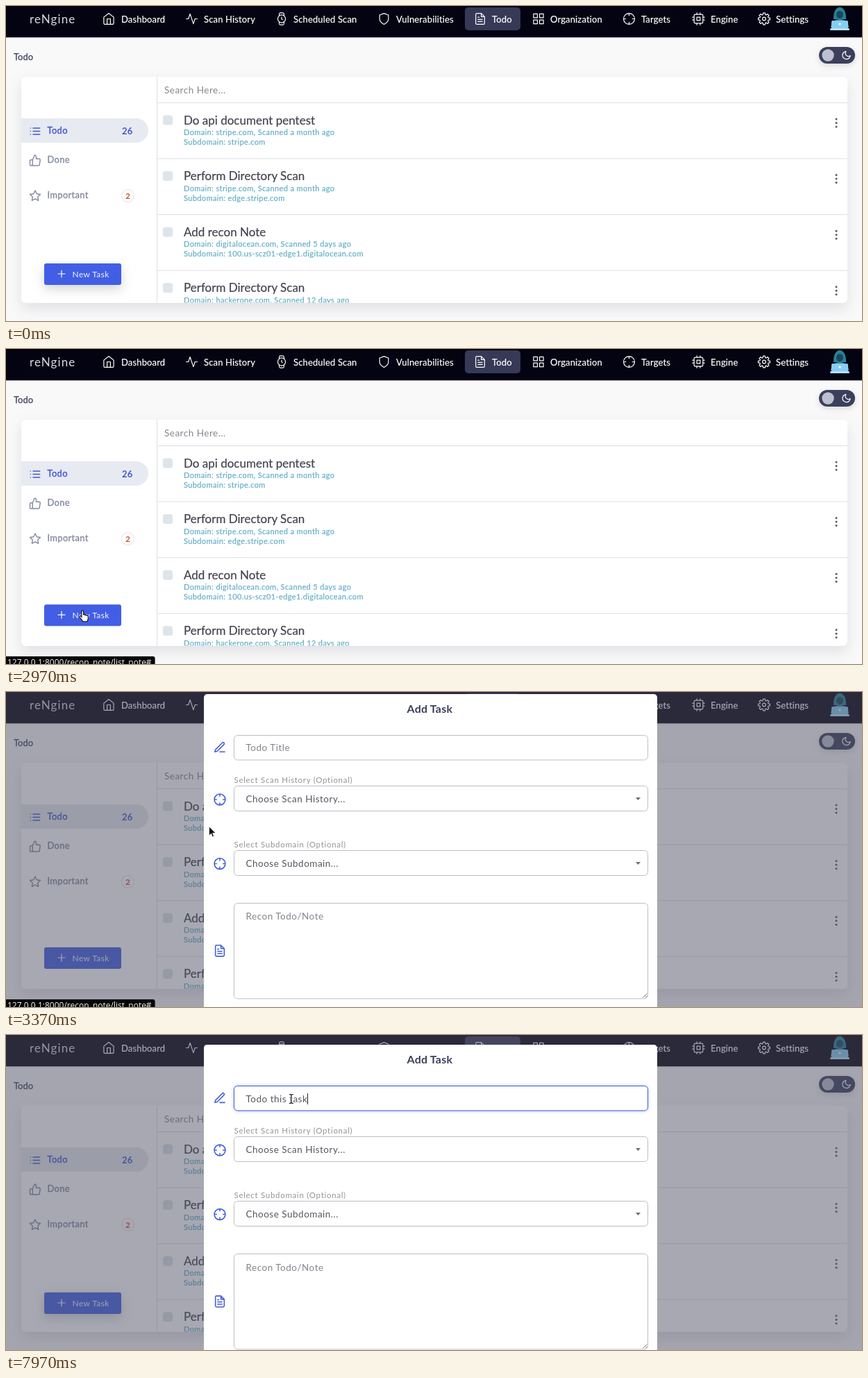
An HTML page that plays this animation: 1233 by 454 pixels, repeating every 8 s.

```html
<!DOCTYPE html>
<html lang="en">
<head>
<meta charset="utf-8">
<title>Todo</title>
<style>
  html, body { margin: 0; width: 100%; height: 100%; overflow: hidden; background: #f9f9f9; }
  svg { display: block; width: 1233px; height: 454px; }
  text { font-family: Lato, "Open Sans", sans-serif; white-space: pre; }
  .icon { fill: none; stroke-linecap: round; stroke-linejoin: round; }
  .brand { font-size: 17px; letter-spacing: 1.1px; fill: #d9dae3; }
  .nav { font-size: 13px; letter-spacing: .15px; fill: #fff; stroke: #fff; stroke-width: .2px; }
  .page { font-size: 13px; fill: #3b3f5c; stroke: #3b3f5c; stroke-width: .25px; }
  .title { font-size: 17px; fill: #42424e; stroke: #42424e; stroke-width: .2px; }
  .meta { font-size: 11px; letter-spacing: .38px; fill: #62adc5; stroke: #62adc5; stroke-width: .2px; }
  .side { font-size: 13px; letter-spacing: .3px; stroke-width: .35px; }
  .count { font-weight: 700; letter-spacing: .2px; }
  .badge { font-size: 12px; font-weight: 700; text-anchor: middle; }
  .btn { font-size: 12px; letter-spacing: .4px; fill: #f2f4ff; }
  .head { font-size: 16px; font-weight: 700; letter-spacing: .2px; fill: #3b3f5c; }
  .field { font-size: 13.5px; letter-spacing: .5px; fill: #55565e; }
  .hint { fill: #84858c; }
  .label { font-size: 11.5px; letter-spacing: .7px; fill: #92939b; }
  .status { font: 12px "Open Sans", "Noto Sans", sans-serif; fill: #f4f4f4; }
</style>
</head>
<body>
<svg id="stage" viewBox="0 0 1233 454"></svg>
<script>
const ICONS = {
  home: 'M3 9l9-7 9 7v11a2 2 0 0 1-2 2H5a2 2 0 0 1-2-2zM9 22V12h6v10',
  activity: 'M22 12h-4l-3 9L9 3l-3 9H2',
  watch: 'M5 12a7 7 0 1 0 14 0a7 7 0 1 0-14 0M12 9v3l1.5 1.5M16.5 17.35l-.35 3.83a2 2 0 0 1-2 1.82H9.83a2 2 0 0 1-2-1.82l-.35-3.83m0-10.7l.35-3.83A2 2 0 0 1 9.83 1h4.35a2 2 0 0 1 2 1.82l.35 3.83',
  shield: 'M12 22s8-4 8-10V5l-8-3-8 3v7c0 6 8 10 8 10z',
  file: 'M14 2H6a2 2 0 0 0-2 2v16a2 2 0 0 0 2 2h12a2 2 0 0 0 2-2V8zM14 2v6h6M16 13H8M16 17H8M10 9H8',
  grid: 'M3 3h7v7H3zM14 3h7v7h-7zM14 14h7v7h-7zM3 14h7v7H3z',
  cross: 'M2 12a10 10 0 1 0 20 0a10 10 0 1 0-20 0M22 12h-4M6 12H2M12 6V2M12 22v-4',
  cpu: 'M6 4h12a2 2 0 0 1 2 2v12a2 2 0 0 1-2 2H6a2 2 0 0 1-2-2V6a2 2 0 0 1 2-2zM9 9h6v6H9zM9 1v3M15 1v3M9 20v3M15 20v3M20 9h3M20 14h3M1 9h3M1 14h3',
  list: 'M8 6h13M8 12h13M8 18h13M3 6h.01M3 12h.01M3 18h.01',
  thumb: 'M14 9V5a3 3 0 0 0-3-3l-4 9v11h11.28a2 2 0 0 0 2-1.7l1.38-9a2 2 0 0 0-2-2.3zM7 22H4a2 2 0 0 1-2-2v-7a2 2 0 0 1 2-2h3',
  star: 'M12 2l3.09 6.26L22 9.27l-5 4.87 1.18 6.88L12 17.77l-6.18 3.25L7 14.14 2 9.27l6.91-1.01z',
  plus: 'M12 4v16M4 12h16',
  edit: 'M12 20h9M16.5 3.5a2.12 2.12 0 0 1 3 3L7 19l-4 1 1-4z',
  moon: 'M21 12.79A9 9 0 1 1 11.21 3 7 7 0 0 0 21 12.79z',
  gear: gearPath()
};

// Eight-toothed cog around (12,12) with a hub.
function gearPath() {
  const pts = [];
  for (let i = 0; i < 8; i++) {
    for (const [off, r] of [[-.27, 8], [-.17, 10.8], [.17, 10.8], [.27, 8]]) {
      const a = i * Math.PI / 4 + off;
      pts.push((12 + r * Math.cos(a)).toFixed(2) + ' ' + (12 + r * Math.sin(a)).toFixed(2));
    }
  }
  return 'M' + pts.join('L') + 'zM9 12a3 3 0 1 0 6 0a3 3 0 1 0-6 0';
}

const text = (x, y, cls, str, extra = '') => `<text x="${x}" y="${y}" class="${cls}" ${extra}>${str}</text>`;
const box = (x, y, w, h, r, fill, extra = '') =>
  `<rect x="${x}" y="${y}" width="${w}" height="${h}" rx="${r}" fill="${fill}" ${extra}/>`;
const line = (x1, y1, x2, y2, c = '#dedfe4') => `<path d="M${x1} ${y1}L${x2} ${y2}" stroke="${c}"/>`;
// Icon centred on (x, y), drawn at the given size.
const icon = (name, x, y, color, size = 19, width = 1.6) =>
  `<path class="icon" d="${ICONS[name]}" stroke="${color}" stroke-width="${width}"
    transform="translate(${x - size / 2} ${y - size / 2}) scale(${size / 24})"/>`;

const NAV = [
  ['home', 148, 166, 'Dashboard'], ['activity', 267.5, 285, 'Scan History'],
  ['watch', 397, 414, 'Scheduled Scan'], ['shield', 544.5, 562, 'Vulnerabilities'],
  ['file', 683, 700, 'Todo'], ['grid', 767, 784, 'Organization'],
  ['cross', 897.5, 915, 'Targets'], ['cpu', 997.5, 1015, 'Engine'], ['gear', 1092, 1109, 'Settings']
];
const ROWS = [
  ['Do api document pentest', 'stripe.com', 'a month', 'stripe.com'],
  ['Perform Directory Scan', 'stripe.com', 'a month', 'edge.stripe.com'],
  ['Add recon Note', 'digitalocean.com', '5 days', '100.us-scz01-edge1.digitalocean.com'],
  ['Perform Directory Scan', 'hackerone.com', '12 days', 'hackerone.com']
];

function header() {
  const items = NAV.map(([name, ix, tx, label]) =>
    icon(name, ix, 18.5, '#fff', 19, 1.5) + text(tx, 24, 'nav', label)).join('');
  const avatar = `<path d="M1192 19c-1-23 19-23 18 0z" fill="#2a7f98"/>
    <ellipse cx="1201" cy="12.5" rx="5" ry="5.5" fill="#17485c"/>
    <path d="M1188 31c0-16 26-16 26 0z" fill="#3b8fb0"/>
    ${box(1189, 21, 24, 12, 2, '#86cdf3')}${box(1187, 32, 28, 3, 1.5, '#b5e2fa')}
    <circle cx="1201" cy="26" r="1.8" fill="#e6f6ff"/>`;
  return box(0, 0, 1233, 45.5, 0, '#040312') + box(0, 45.5, 1233, 1, 0, '#efe6ef') +
    text(34, 25, 'brand', 'reNgine') + box(661, 2, 80, 33, 5, '#363a57') + items + avatar +
    text(11, 78, 'page', 'Todo') +
    box(1171, 59, 52, 24, 12, '#3b3f5c', 'style="filter:drop-shadow(0 3px 4px rgba(0,0,0,.12))"') +
    '<circle cx="1184" cy="71" r="8.7" fill="#bcc1cf"/>' + icon('moon', 1210.5, 71, '#fff', 15, 1.9);
}

function row([name, domain, age, sub], i) {
  const y = 139.5 + 80.6 * i;
  const dots = [23.5, 29, 34.5].map(d => `<circle cx="1196" cy="${y + d}" r="1.5" fill="#595b68"/>`).join('');
  return `<g id="row${i}">` + box(226, y + 18, 14, 14, 3.5, '#dee4ea') +
    text(256, y + 31, 'title', name) +
    text(256, y + 46.5, 'meta', `Domain: ${domain}, Scanned ${age} ago`) +
    text(256, y + 60.5, 'meta', `Subdomain: ${sub}`) + dots +
    line(218, y + 80.5, 1212, y + 80.5) + '</g>';
}

function card() {
  return box(22, 102, 1190, 326, 6, '#fff', 'style="filter:drop-shadow(0 8px 10px rgba(60,65,90,.13))"') +
    '<clipPath id="clip"><rect x="22" y="102" width="1190" height="325.5" rx="6"/></clipPath><g clip-path="url(#clip)">' +
    text(228, 125.5, 'field hint', 'Search Here...') + ROWS.map(row).join('') +
    line(218, 139.5, 1212, 139.5) + line(217.5, 102, 217.5, 428) + '</g>' +
    '<g id="side"></g><g id="new">' +
    box(55, 371, 111, 31, 3, '#425ee4', 'id="btn"') + icon('plus', 80, 386, '#fff', 15, 1.9) +
    text(95.5, 390.5, 'btn', 'New Task') + '</g>';
}

const pill = (y, h, r, fill) => `<path d="M22 ${y}H${205 - r}a${r} ${r} 0 0 1 ${r} ${r}v${h - 2 * r}a${r} ${r} 0 0 1 ${-r} ${r}H22z" fill="${fill}"/>`;

function sidebar(important, hover) {
  const blue = '#4058d2', grey = '#858aa2';
  const item = (name, y, label, c, ic = c) => icon(name, 42, y + 1, ic, 18, 1.9) +
    text(59.5, y + 4.5, 'side', label, `fill="${c}" stroke="${c}"`);
  const star = important ? 279 : 273;
  const ring = important ? '#8d90ad' : '#dfe3ea';
  const todo = important
    ? (hover ? pill(162, 47, 5, '#f8f9fc') : '') + item('list', 184.5, 'Todo', hover ? blue : grey) +
      text(168, 184, 'count', '26', 'font-size="11.5" fill="#35437f"')
    : pill(162, 35, 17.5, '#e7eaf0') + item('list', 179.5, 'Todo', blue) +
      text(167, 184.5, 'count', '26', `font-size="13" fill="${blue}"`);
  return todo + item('thumb', important ? 234 : 221.5, 'Done', grey) +
    (important ? pill(260, 38, 18, '#efeff2') : '') +
    item('star', star - .5, 'Important', important ? blue : grey, grey) +
    `<circle cx="175.5" cy="${star + .5}" r="9" fill="${important ? 'none' : '#fff'}" stroke="${ring}"/>` +
    text(175.5, star + 4.5, 'badge', 2, `fill="${important ? '#5c6192' : '#d2503f'}"`);
}

function modal() {
  const frame = (y, h, id = '') => box(328.5, y + .5, 596, h, 5, '#fff', `stroke="#bcbfc7" ${id}`);
  const select = (y, label, value) => text(328.5, y - 4, 'label', label) + frame(y, 36) +
    text(345.5, y + 24, 'field', value) + `<path d="M907 ${y + 17}h7l-3.5 4z" fill="#6c6d75"/>`;
  const side = [['edit', 91], ['cross', 166], ['cross', 258.5], ['file', 384]]
    .map(([name, y]) => icon(name, 308, y, '#4360d6', 19, 2)).join('');
  return box(285, 14, 653, 520, 5, '#fff') + text(577.5, 41, 'head', 'Add Task') + side +
    frame(73, 35.5, 'id="input"') + text(345.5, 96.5, 'field', '', 'id="typed"') +
    '<path id="caret" stroke="#222"/>' +
    select(146, 'Select Scan History (Optional)', 'Choose Scan History...') +
    select(239, 'Select Subdomain (Optional)', 'Choose Subdomain...') +
    frame(315, 137.5) + text(345.5, 339.5, 'field hint', 'Recon Todo/Note') +
    '<path d="M917.5 451.5l6-6M921 451.5l2.5-2.5" stroke="#777"/>';
}

const beam = (color, width) =>
  `<path d="M-3-6.5q3 0 3 1.5q0-1.5 3-1.5M0-5v10M-3 6.5q3 0 3-1.5q0 1.5 3 1.5" fill="none" stroke="${color}" stroke-width="${width}"/>`;
const POINTERS = {
  arrow: '<path d="M0 0v13.5l3.1-2.9 2 4.7 2.2-.9-2-4.6h4.4z" fill="#111" stroke="#fff" stroke-width=".9"/>',
  hand: '<path d="M-1.4 1.2c0-1.6 2.6-1.6 2.6 0v5c.4-1 2.3-.8 2.4.4.6-.8 2.2-.5 2.3.6.8-.6 2 0 2 1.1v3.2c0 1.2-.9 2-1 4.3h-6.7c-.8-2.6-2.9-3.9-4.4-6.3-.6-1.5.9-2.2 1.7-1.3l1.1 1.2z" fill="#fff" stroke="#111" stroke-width="1.1"/>',
  beam: beam('#fff', 2.6) + beam('#111', 1.2)
};

document.getElementById('stage').innerHTML = box(0, 0, 1233, 454, 0, '#f9f9f9') + header() + card() +
  box(0, 0, 1233, 454, 0, '#515365', 'id="shade"') + `<g id="modal">${modal()}</g>` +
  '<g id="bar">' + box(-4, 443, 10, 20, 3, '#050505', 'id="barBox"') + text(2, 455.5, 'status', '', 'id="url"') +
  '</g><g id="mouse">' +
  Object.entries(POINTERS).map(([k, v]) => `<g id="${k}">${v}</g>`).join('') + '</g>';

const $ = id => document.getElementById(id);
const set = (id, attrs) => { for (const k in attrs) $(id).setAttribute(k, attrs[k]); };
const show = (id, on) => set(id, { visibility: on ? 'visible' : 'hidden' });
const ramp = (t, a, b) => Math.min(1, Math.max(0, (t - a) / (b - a)));
const swing = p => .5 - Math.cos(p * Math.PI) / 2;
// Last entry of a [time, value] table reached at t.
const at = (table, t) => table.reduce((found, step) => step[0] <= t ? step : found, table[0]);

const PATH = [[400, 140, 63], [780, 105, 274], [1530, 105, 274], [2200, 95, 193], [2420, 95, 193],
  [2880, 110, 377], [3140, 111, 377], [3270, 194, 296], [3370, 292, 194], [3640, 400, 100], [3850, 411, 92]];
const SHAPE = [[0, 'arrow'], [600, 'hand'], [2560, 'arrow'], [2820, 'hand'], [3060, 'arrow'], [3600, 'beam']];
const URLS = [[0, ''], [600, '#pills-inbox'], [720, '#pills-important'], [2050, '#pills-inbox'],
  [2600, ''], [2850, '#'], [3640, '']];
const TYPING = [[0, ''], [4730, 'T'], [4870, 'To'], [5100, 'Tod'], [5230, 'Todo '], [5470, 'Todo t'],
  [5670, 'Todo th'], [5830, 'Todo thi'], [5930, 'Todo this'], [6030, 'Todo this i'], [6230, 'Todo this it'],
  [6700, 'Todo this i'], [6830, 'Todo this'], [7000, 'Todo thi'], [7130, 'Todo this'], [7300, 'Todo this '],
  [7630, 'Todo this t'], [7730, 'Todo this ta'], [7870, 'Todo this tas'], [7970, 'Todo this task']];

function pointer(t) {
  const i = Math.max(0, PATH.findLastIndex(p => p[0] <= t));
  const a = PATH[i], b = PATH[i + 1] || a;
  const p = a === b ? 0 : ramp(t, a[0], b[0]);
  set('mouse', { transform: `translate(${a[1] + (b[1] - a[1]) * p} ${a[2] + (b[2] - a[2]) * p})` });
  const shape = at(SHAPE, t)[1];
  for (const k in POINTERS) show(k, t >= 400 && k === shape);
}

function status(t) {
  const hash = at(URLS, t)[1];
  show('bar', hash);
  $('url').textContent = '127.0.0.1:8000/recon_note/list_note' + hash;
  set('barBox', { width: $('url').getComputedTextLength() + 11 });
}

function input(t) {
  const [since, value] = at(TYPING, t);
  const typed = $('typed'), from = Math.max(since, 4030);
  typed.textContent = value;
  const x = Math.round(345.5 + (value ? typed.getComputedTextLength() : 0)) + .5;
  set('caret', { d: `M${x} 84v16` });
  show('caret', t >= 4030 && (t - from) % 1000 < 500);
  if (!value) typed.textContent = 'Todo Title';
  set('typed', { class: value ? 'field' : 'field hint' });
  const f = ramp(t, 4000, 4100);
  set('input', {
    stroke: `rgb(${188 - 121 * f},${191 - 95 * f},${199 + 7 * f})`,
    style: `filter:drop-shadow(0 0 2px rgba(67,97,238,${.45 * f}))`
  });
}

let sideKey;
function draw(t) {
  const important = t >= 800 && t < 2410;
  const hover = t >= 2050;
  const key = `${important}${hover}`;
  if (key !== sideKey) $('side').innerHTML = sidebar(important, hover);
  sideKey = key;

  ROWS.forEach((_, i) => {
    const fade = t < 800 ? 1 : t < 2310 ? (i < 2 ? swing(ramp(t, 800, 1200)) : 0) : swing(ramp(t, 2310, 2710));
    set('row' + i, { opacity: fade });
  });

  const lift = ramp(t, 2850, 2980) - ramp(t, 3370, 3520);
  set('new', { transform: `translate(0 ${-3 * lift})` });
  set('btn', { style: `filter:drop-shadow(0 6px 8px rgba(31,45,61,${.2 * (1 - lift)}))` });

  set('shade', { opacity: .5 * ramp(t, 3055, 3200) });
  const drop = -50 * Math.pow(1 - ramp(t, 3189, 3489), 1.62);
  set('modal', { opacity: ramp(t, 3214, 3360), transform: `translate(0 ${drop})` });
  input(t);
  status(t);
  pointer(t);
}

function frame() {
  draw(performance.now() % 8000);
  requestAnimationFrame(frame);
}
frame();
</script>
</body>
</html>
```
